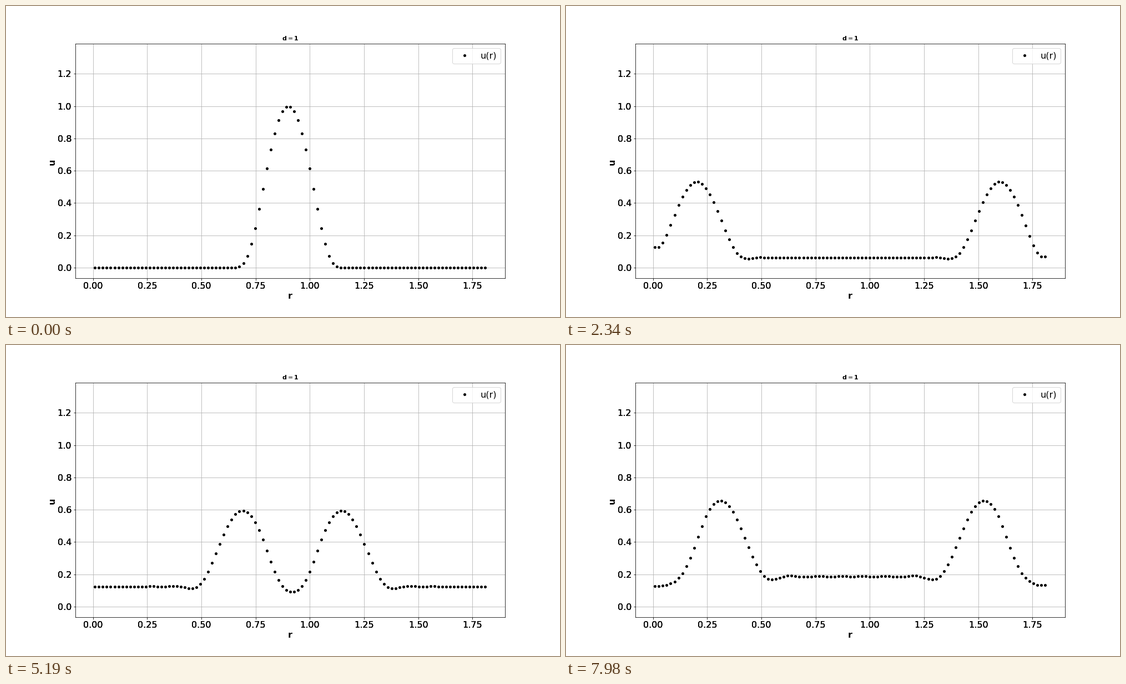
A matplotlib script that plays this animation: 998 px wide and 561 px high, repeating every 8000 ms.

```python
import numpy as np
import matplotlib.pyplot as plt
from matplotlib.animation import FuncAnimation

W, H, DPI = 998, 561, 72
LOOP_MS, FRAMES = 8000, 267
LEFT, RIGHT, TOP, BOTTOM = 125.2, 898.6, 68.2, 491.2
FONT = 16

# Wave equation on a staggered grid, leapfrog in time
DR, COURANT, KICK = 0.018, 0.5, 0.00487
r = (np.arange(101) + 0.5) * DR


def bump(x, width=0.3):
    s = np.minimum((x / width) ** 2, 1 - 1e-9)
    return np.exp(-4 * s / (1 - s))


def solve():
    u = bump(r - 0.9)
    prev = (1 - KICK) * u
    states = [u]
    for _ in range(FRAMES - 1):
        nxt = np.empty_like(u)
        curve = u[2:] - 2 * u[1:-1] + u[:-2]
        nxt[1:-1] = 2 * u[1:-1] - prev[1:-1] + COURANT ** 2 * curve
        nxt[0], nxt[-1] = nxt[1], nxt[-2]  # reflecting walls
        prev, u = u, nxt
        states.append(u)
    return states


states = solve()

plt.rcParams["font.family"] = "DejaVu Sans"
fig = plt.figure(figsize=((W + 1e-6) / DPI, (H + 1e-6) / DPI), dpi=DPI,
                 facecolor="white")
ax = fig.add_axes([LEFT / W, 1 - BOTTOM / H,
                   (RIGHT - LEFT) / W, (BOTTOM - TOP) / H])
ax.set_xlim(-0.081, 1.899)
ax.set_ylim(-0.066, 1.386)
xticks = np.arange(8) * 0.25
yticks = np.arange(7) * 0.2
ax.set_xticks(xticks)
ax.set_yticks(yticks)
ax.tick_params(labelbottom=False, labelleft=False)
ax.grid(True)


def tick_label(text, xy, coords, shift, ha, va):
    # Repeated drawing hardens the glyph edges
    for _ in range(3):
        ax.annotate(text, xy, xycoords=coords, xytext=shift,
                    textcoords="offset points", ha=ha, va=va, fontsize=FONT)


for x in xticks:
    tick_label(f"{x:.2f}", (x, 0), ax.get_xaxis_transform(), (0, -7),
               "center", "top")
for y in yticks:
    tick_label(f"{y:.1f}", (0, y), ax.get_yaxis_transform(), (-7, 0),
               "right", "center_baseline")


def axis_label(text, x, y, rotation=0):
    fig.text(x / W, 1 - y / H, text, fontsize=FONT, weight="bold",
             ha="center", va="center", rotation=rotation)


axis_label("r", 512, 523)
axis_label("u", 83.5, 281, 90)
ax.set_title(r"$\mathbf{d}=\mathbf{1}$", fontsize=11, pad=6)

dots, = ax.plot(r, states[0], "k.", markersize=8, label="u(r)")
ax.legend(loc="upper right", fontsize=FONT)


def update(i):
    dots.set_ydata(states[i])
    return dots,


def init():
    return update(0)


anim = FuncAnimation(fig, update, frames=FRAMES, init_func=init,
                     interval=LOOP_MS / FRAMES, repeat=True, repeat_delay=0,
                     blit=False)
plt.show()
```
